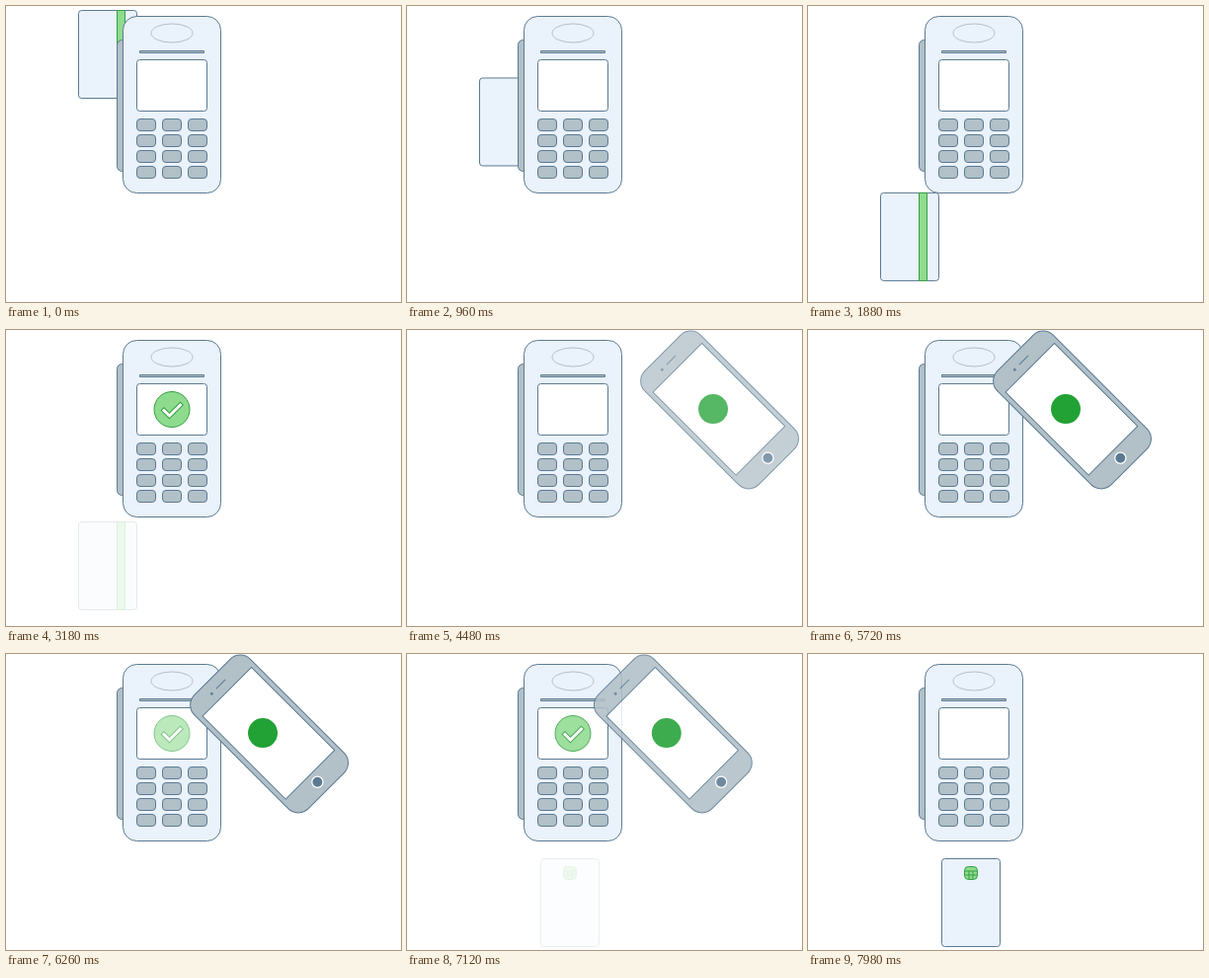
Animation, 400 px wide and 300 px high, one loop 8000 ms. Source, as an HTML page with a canvas:

```html
<!DOCTYPE html>
<html lang="en">
<head>
<meta charset="utf-8">
<title>Card reader</title>
<style>
  html, body { margin: 0; width: 100%; height: 100%; overflow: hidden; background: #fff; }
  canvas { display: block; }
</style>
</head>
<body>
<canvas id="stage" width="400" height="300"></canvas>
<script>
const LOOP = 8000;
const LINE = '#5b7a92', PALE = '#eaf2fb', GREY = '#b2c0c8';
const GREEN = '#8edb8e', DARK = '#35a043', MARK = '#22a135';

const stage = document.getElementById('stage').getContext('2d');
const layer = document.createElement('canvas');
layer.width = 400;
layer.height = 300;
const soft = layer.getContext('2d');

// Easing and timing
const clamp = p => Math.min(1, Math.max(0, p));
const span = (t, start, length) => clamp((t - start) / length);
const quadInOut = p => p < 0.5 ? 2 * p * p : 1 - 2 * (1 - p) ** 2;
const sineInOut = p => (1 - Math.cos(Math.PI * p)) / 2;

function bezier(x1, y1, x2, y2) {
  const at = (a, b, s) => 3 * a * s * (1 - s) ** 2 + 3 * b * s * s * (1 - s) + s ** 3;
  return p => {
    let lo = 0, hi = 1;
    for (let i = 0; i < 24; i++) {
      const mid = (lo + hi) / 2;
      if (at(x1, x2, mid) < p) lo = mid; else hi = mid;
    }
    return at(y1, y2, lo);
  };
}
const ease = bezier(0.25, 0.1, 0.25, 1);

// Drawing helpers
function paint(c, fill, line, width = 1) {
  if (fill) {
    c.fillStyle = fill;
    c.fill();
  }
  if (line) {
    c.strokeStyle = line;
    c.lineWidth = width;
    c.stroke();
  }
}

function box(c, x, y, w, h, r, fill, line = LINE) {
  c.beginPath();
  c.roundRect(x, y, w, h, r);
  paint(c, fill, line);
}

function oval(c, x, y, rx, ry, fill, line, width) {
  c.beginPath();
  c.ellipse(x, y, rx, ry, 0, 0, Math.PI * 2);
  paint(c, fill, line, width);
}

function path(c, points, line, width = 1) {
  c.beginPath();
  points.forEach(([x, y]) => c.lineTo(x, y));
  paint(c, null, line, width);
}

// Draws a group at one opacity
function fade(alpha, draw) {
  if (alpha <= 0) return;
  soft.clearRect(0, 0, 400, 300);
  soft.save();
  draw(soft);
  soft.restore();
  stage.globalAlpha = alpha;
  stage.drawImage(layer, 0, 0);
  stage.globalAlpha = 1;
}

function stripeCard(c, y) {
  c.translate(73.5, y);
  box(c, 0, 0, 59, 89, 3, PALE);
  box(c, 39, 0, 8, 89, 0, GREEN, DARK);
}

function chipCard(c) {
  c.translate(135.5, 207.5);
  box(c, 0, 0, 59, 89, 3, PALE);
  box(c, 23, 8, 13, 13, 4, GREEN, DARK);
  path(c, [[23, 12.5], [36, 12.5]], DARK);
  path(c, [[23, 16.5], [36, 16.5]], DARK);
  path(c, [[27.5, 12.5], [27.5, 21]], DARK);
  path(c, [[31.5, 12.5], [31.5, 21]], DARK);
}

function reader(c) {
  box(c, 112.5, 34.5, 14, 133, 5, GREY);
  box(c, 118.5, 10.5, 99, 179, 14, PALE);
  oval(c, 168, 27.5, 21, 9.5, null, '#b5c0c8');
  box(c, 135.5, 45.5, 65, 2, 0, GREY);
  box(c, 132.5, 54.5, 71, 52, 3, '#fff');
  for (let row = 0; row < 4; row++) {
    for (let col = 0; col < 3; col++) {
      box(c, 132.5 + 26 * col, 114.5 + 16 * row, 19, 12, 3.5, GREY);
    }
  }
}

function check(c) {
  const tick = [[160, 81.5], [165.5, 87], [176.5, 76]];
  oval(c, 168, 80.5, 18, 18, GREEN, DARK);
  c.lineCap = 'square';
  path(c, tick, DARK, 5);
  path(c, tick, '#fff', 3);
}

function phone(c, x) {
  c.translate(x, 81);
  c.rotate(-Math.PI / 4);
  box(c, -40, -81.5, 80, 163, 14.5, GREY);
  box(c, -35, -60.5, 70, 119, 0, '#fff');
  oval(c, -12.4, -70, 1.2, 1.2, LINE, LINE, 0.5);
  path(c, [[-5.5, -70.4], [7.5, -70.4]], LINE);
  oval(c, 0, 69, 5.6, 5.6, LINE, '#fff', 1.3);
  oval(c, -4, -5.3, 15, 15, MARK);
}

function render(t) {
  stage.fillStyle = '#fff';
  stage.fillRect(0, 0, 400, 300);

  const slide = quadInOut(span(t, 112, 2000));
  fade(1 - span(t, 2340, 1000), c => stripeCard(c, 4.5 + 190 * slide));
  reader(stage);

  const first = span(t, 2110, 900) - span(t, 3320, 880);
  const second = span(t, 5750, 850) - span(t, 7000, 880);
  fade(first + second, check);

  const x = 316.6 - 50 * ease(span(t, 4860, 1050)) + 50 * sineInOut(span(t, 6970, 1000));
  fade(span(t, 3320, 1530) - span(t, 7000, 950), c => phone(c, x));

  fade(span(t, 7000, 980), chipCard);
}

function tick(now) {
  render(now % LOOP);
  requestAnimationFrame(tick);
}
requestAnimationFrame(tick);
</script>
</body>
</html>
```
